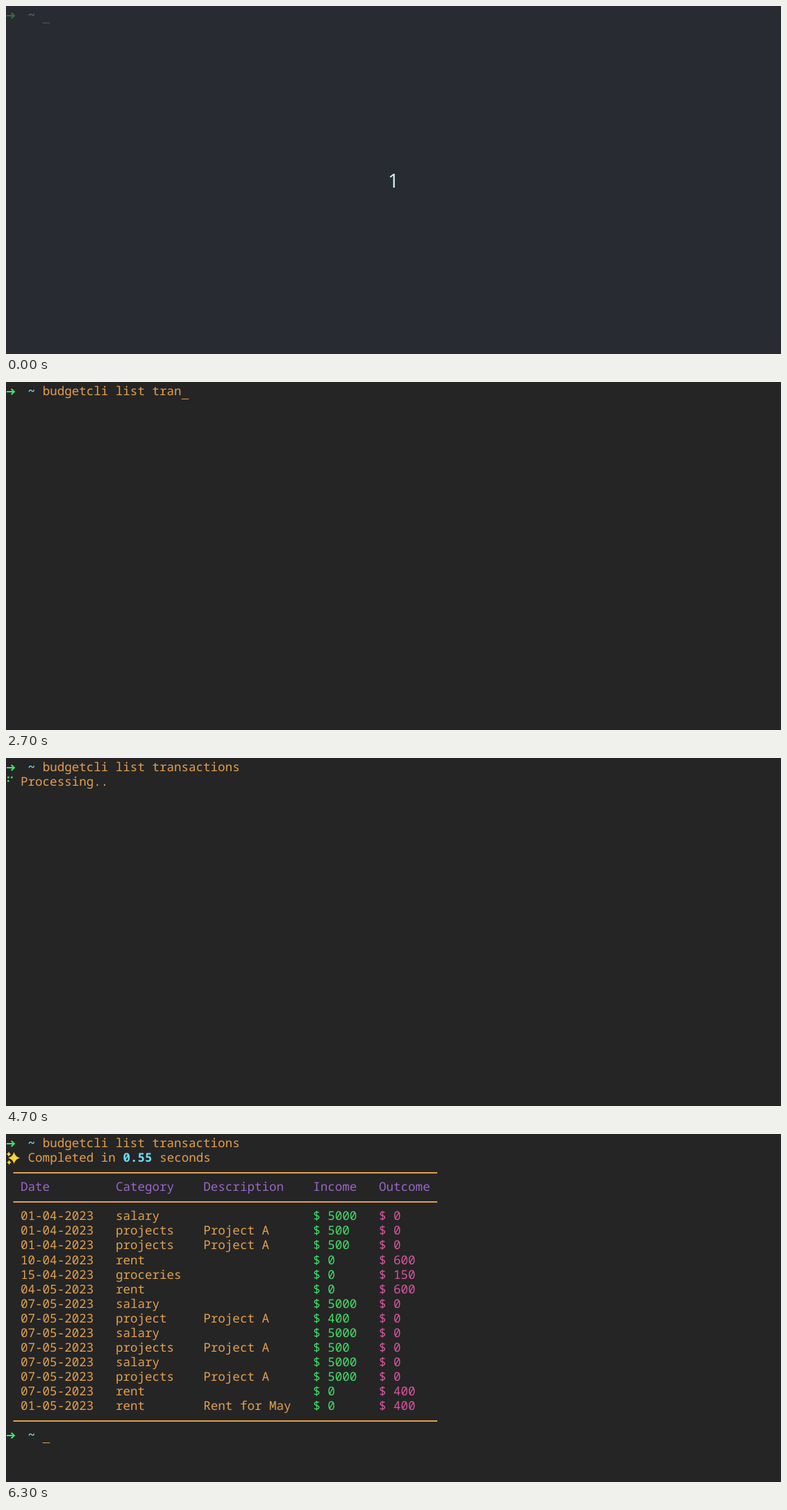
Animation, 1116 px wide and 502 px high, one loop 6.4 s. Source, as an HTML page:

```html
<!DOCTYPE html>
<html lang="en">
<head>
<meta charset="utf-8">
<title>budgetcli</title>
<style>
  html, body { margin: 0; width: 100%; height: 100%; overflow: hidden; background: #252525; }
  svg { display: block; width: 1116px; height: 502px; }
  text { font: 17.55px "Noto Sans Mono", monospace; white-space: pre; text-rendering: geometricPrecision; }
  .orange { fill: #e3a04f; }
  .green { fill: #40e066; }
  .cyan { fill: #70dcf4; font-weight: 700; }
  .purple { fill: #9a66cc; }
  .pink { fill: #d8559f; }
  .arrow { fill: none; stroke: #40e066; stroke-width: 2.2; }
  .count { font: 28px "Open Sans", sans-serif; fill: #d9f3fa; }
</style>
</head>
<body>
<svg id="stage" viewBox="0 0 1116 502"></svg>
<script>
const CELL = 10.53, LINE = 21.07, LOOP = 6400;
const COMMAND = "budgetcli list transactions";
const stage = document.getElementById("stage");

function add(parent, tag, attrs, content = "") {
  const node = document.createElementNS("http://www.w3.org/2000/svg", tag);
  for (const key in attrs) node.setAttribute(key, attrs[key]);
  node.textContent = content;
  return parent.appendChild(node);
}
const group = () => add(stage, "g", {});
const write = (parent, row, col, color, content) =>
  add(parent, "text", { x: col * CELL, y: 19 + row * LINE, class: color }, content);
const show = (node, visible) => node.setAttribute("visibility", visible ? "visible" : "hidden");

function prompt(parent, row) {
  const y = 14 + Math.round(row * LINE);
  add(parent, "path", { class: "arrow", d: `M1 ${y}H12M7.6 ${y - 4}l4.2 4-4.2 4` });
  write(parent, row, 3, "cyan", "~");
}

function sparkle(parent, x, y, r) {
  const k = r * 0.2;
  add(parent, "path", {
    fill: "#fbd43c",
    d: `M${x} ${y - r}Q${x + k} ${y - k} ${x + r} ${y}Q${x + k} ${y + k} ${x} ${y + r}` +
       `Q${x - k} ${y + k} ${x - r} ${y}Q${x - k} ${y - k} ${x} ${y - r}Z`
  });
}

// Command line
const shell = group();
prompt(shell, 0);
const typed = write(shell, 0, 5, "orange", "");

// Spinner made of a 2 x 3 braille cell; bits follow the braille dot order
const busy = group();
write(busy, 1, 2, "orange", "Processing..");
const SPINNER = "⠋⠙⠹⠸⠼⠴⠦⠧⠇⠏";
const dots = [0, 1, 2, 3, 4, 5].map(i => add(busy, "circle", {
  cx: i < 3 ? 3.3 : 8.3, cy: 28 + (i % 3) * 5.2, r: 1.4, class: "green"
}));

// Result table
const result = group();
sparkle(result, 11.5, 34.5, 8.5);
sparkle(result, 4, 29, 3.6);
sparkle(result, 4.5, 41, 3.4);
write(result, 1, 3, "orange", "Completed in");
write(result, 1, 16, "cyan", "0.55");
write(result, 1, 21, "orange", "seconds");
for (const y of [55, 97, 413])
  add(result, "rect", { x: 10.5, y, width: 610.5, height: 2, class: "orange" });

const COLUMNS = [2, 15, 27, 42, 51];
const COLORS = ["orange", "orange", "orange", "green", "pink"];
["Date", "Category", "Description", "Income", "Outcome"].forEach((title, i) =>
  write(result, 3, COLUMNS[i], "purple", title));
`01-04|salary||5000|0
01-04|projects|Project A|500|0
01-04|projects|Project A|500|0
10-04|rent||0|600
15-04|groceries||0|150
04-05|rent||0|600
07-05|salary||5000|0
07-05|project|Project A|400|0
07-05|salary||5000|0
07-05|projects|Project A|500|0
07-05|salary||5000|0
07-05|projects|Project A|5000|0
07-05|rent||0|400
01-05|rent|Rent for May|0|400`.split("\n").forEach((line, n) => {
  const [day, category, note, income, outcome] = line.split("|");
  [day + "-2023", category, note, "$ " + income, "$ " + outcome].forEach((value, i) =>
    write(result, 5 + n, COLUMNS[i], COLORS[i], value));
});
prompt(result, 20);

const cursor = add(stage, "rect", { width: 10.5, height: 1, class: "orange" });

// Countdown veil over the first moment
const veil = group();
add(veil, "rect", { width: 1116, height: 502, fill: "#2a2e39", opacity: 0.65 });
add(veil, "text", { x: 558, y: 262, "text-anchor": "middle", class: "count" }, "1");

// Bursts of typing: [first key time, keys, characters per key], one key per 100 ms
const BURSTS = [[600, 4, 1], [1200, 1, 6], [1600, 6, 1], [2400, 2, 1], [2700, 3, 1],
                [3200, 1, 1], [3400, 2, 1], [3700, 3, 1]];
const typedLength = t => BURSTS.reduce((sum, [start, keys, size]) =>
  sum + size * Math.max(0, Math.min(keys, Math.floor((t - start) / 100) + 1)), 0);

function placeCursor(t, length) {
  const [row, col] = t < 4500 ? [0, 5 + length] : t < 4700 ? [1, 0] : [20, 5];
  cursor.setAttribute("x", col * CELL);
  cursor.setAttribute("y", 24 + Math.round(row * LINE));
  show(cursor, t < 4700 || (t >= 5300 && t < 5800) || t >= 6300);
}

function render(time) {
  const t = Math.floor((time % LOOP) / 100) * 100;
  const length = typedLength(t);
  typed.textContent = COMMAND.slice(0, length);
  placeCursor(t, length);

  const working = t >= 4700 && t < 5300;
  show(busy, working);
  const step = Math.max(0, Math.floor((t - 4700) / 80)) % SPINNER.length;
  const bits = SPINNER.charCodeAt(step) - 0x2800;
  dots.forEach((dot, i) => show(dot, working && bits >> i & 1));

  show(result, t >= 5300);
  show(veil, t < 100);
}

const start = performance.now();
function tick() {
  render(performance.now() - start);
  requestAnimationFrame(tick);
}
tick();
</script>
</body>
</html>
```
